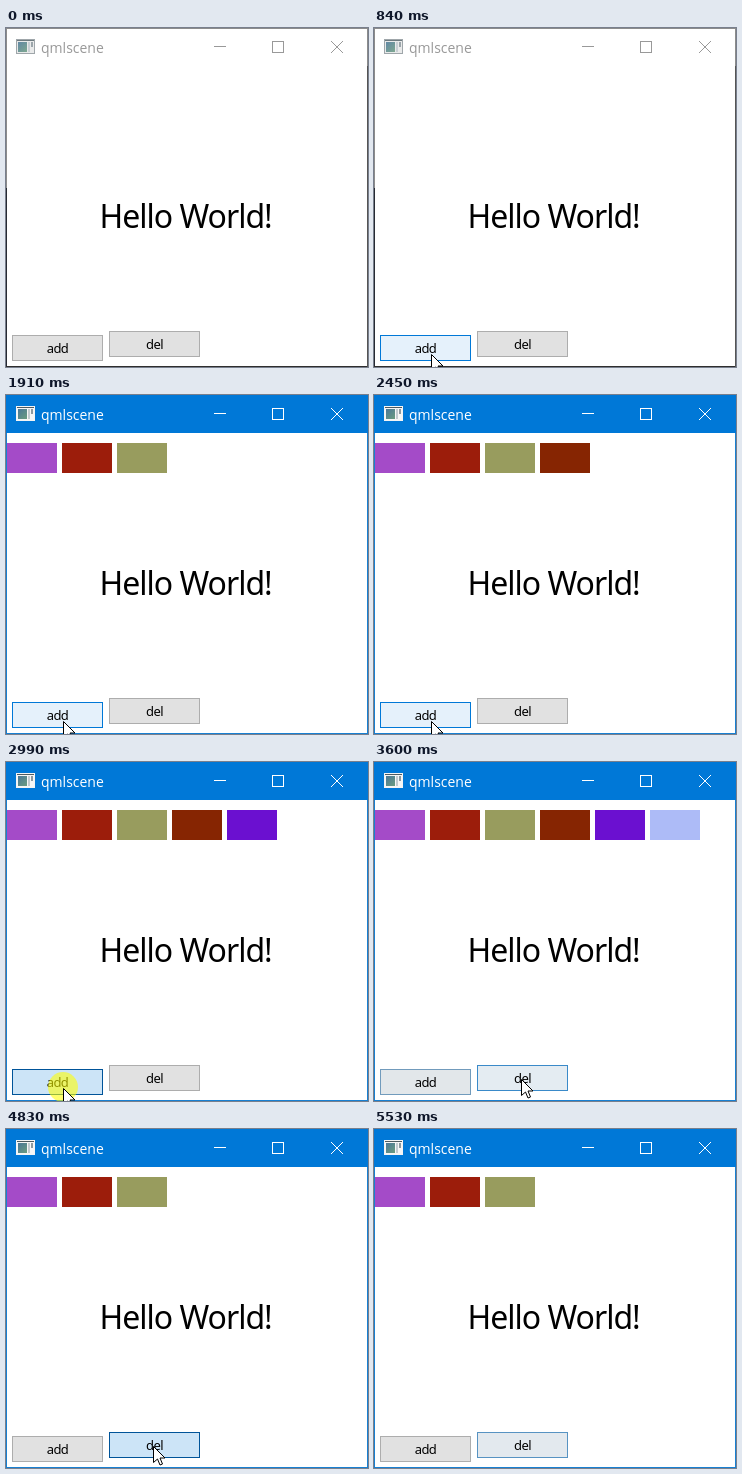
These frames come from a looping animation (362x339 px, 5600 ms). An HTML page with a canvas:

```html
<!DOCTYPE html>
<html lang="en">
<head>
<meta charset="utf-8">
<title>qmlscene</title>
<style>
html, body { margin: 0; width: 100%; height: 100%; overflow: hidden; background: #fff; }
canvas { display: block; }
</style>
</head>
<body>
<canvas id="stage" width="362" height="339"></canvas>
<script>
const ctx = document.getElementById('stage').getContext('2d');
const LOOP = 5600, TICK = 76.7;

const COLORS = ['#a44bc8', '#9c1d0b', '#989c5e', '#862502', '#6b10d0', '#adbbf7'];
const NORMAL = { fill: [225, 225, 225], edge: [173, 173, 173] };
const HOVER = { fill: [229, 241, 251], edge: [0, 120, 215] };
const PRESSED = { fill: [204, 228, 247], edge: [0, 84, 153] };

// Clicks in ticks: highlight on, button down, button up, back to hover
const ADD_CLICKS = [[12, 13, 14, 16], [17, 17, 19, 21], [22, 23, 24, 25],
  [27, 28, 29, 32], [33, 34, 35, 36], [38, 39, 40, 41]];
const DEL_CLICKS = [[51, 52, 53, 55], [57, 58, 59, 60], [61, 61, 63, 66]];
const ACTIVATE = 13;

// Pointer path: tick, x, y
const PATH = [[7, 70, 338], [8, 64, 333], [10, 57, 326], [42, 57, 326],
  [47, 147, 317], [68, 147, 317], [71, 153, 336]];

const ramp = (t, a, b) => Math.min(1, Math.max(0, (t - a) / (b - a)));
const mix = (a, b, k) => a + (b - a) * k;
const mixRgb = (a, b, k) => `rgb(${a.map((v, i) => Math.round(mix(v, b[i], k)))})`;

function rect(color, x, y, w, h) {
  ctx.fillStyle = color;
  ctx.fillRect(x, y, w, h);
}

function frame(color, x, y, w, h) {
  ctx.strokeStyle = color;
  ctx.lineWidth = 1;
  ctx.strokeRect(x + 0.5, y + 0.5, w - 1, h - 1);
}

function text(str, x, y, font, color, spacing = 0, align = 'left') {
  ctx.font = font;
  ctx.letterSpacing = spacing + 'px';
  ctx.textAlign = align;
  ctx.fillStyle = color;
  ctx.fillText(str, x, y);
}

function drawIcon(active) {
  ctx.globalAlpha = active ? 1 : 0.85;
  rect(active ? '#f4f4f4' : '#8f979c', 10, 11, 19, 15);
  rect('#f6f6f6', 11, 13, 17, 12);
  rect(active ? '#4d5a60' : '#66747a', 11, 12, 17, 1);
  const fill = ctx.createLinearGradient(12, 14, 21, 24);
  fill.addColorStop(0, '#4a7798');
  fill.addColorStop(1, '#6b9c80');
  rect(fill, 12, 14, 9, 10);
  rect('#c3cbd0', 22, 14, 2, 10);
  rect('#8d999f', 25, 14, 2, 5);
  ctx.globalAlpha = 1;
}

function drawControls(color) {
  rect(color, 208, 18, 12, 1);
  frame(color, 266, 13, 12, 12);
  ctx.beginPath();
  ctx.moveTo(325, 13);
  ctx.lineTo(337, 25);
  ctx.moveTo(337, 13);
  ctx.lineTo(325, 25);
  ctx.stroke();
}

function drawWindow(active) {
  rect('#fff', 0, 0, 362, 339);
  if (active) {
    frame('#1880d2', 0, 0, 362, 339);
    rect('#0078d7', 0, 0, 362, 38);
  } else {
    frame('#8c8c8c', 0, 0, 362, 339);
    rect('#262a33', 0, 160, 1, 179);
    rect('#2e2e2e', 0, 338, 362, 1);
    rect('#555', 361, 38, 1, 301);
  }
  drawIcon(active);
  const ink = active ? '#fff' : '#999';
  text('qmlscene', 35, 25, '14px "Open Sans", "Noto Sans", sans-serif', ink);
  drawControls(ink);
}

function drawButton(label, x, y, hover, pressed) {
  const base = pressed ? PRESSED : HOVER;
  rect(mixRgb(NORMAL.fill, base.fill, hover), x, y, 91, 26);
  frame(mixRgb(NORMAL.edge, base.edge, hover), x, y, 91, 26);
  text(label, x + 45.5, y + 18, '13px "Noto Sans", sans-serif', '#000', -0.6, 'center');
}

function pointerAt(t) {
  const last = PATH.length - 1;
  if (t < PATH[0][0] || t > PATH[last][0]) return null;
  const i = Math.max(1, PATH.findIndex(p => t <= p[0]));
  const [t0, x0, y0] = PATH[i - 1], [t1, x1, y1] = PATH[i];
  const k = ramp(t, t0, t1);
  return [Math.round(mix(x0, x1, k)), Math.round(mix(y0, y1, k))];
}

function drawPointer(x, y) {
  const shape = [[0, 0], [0, 16], [4, 12.5], [6.5, 18.5], [9, 17.5], [6.5, 11.5], [11.5, 11.5]];
  ctx.beginPath();
  shape.forEach(([dx, dy]) => ctx.lineTo(x + 0.5 + dx, y + 0.5 + dy));
  ctx.closePath();
  ctx.fillStyle = '#fff';
  ctx.fill();
  ctx.strokeStyle = '#000';
  ctx.lineWidth = 1;
  ctx.stroke();
}

function drawHighlight(x, y) {
  ctx.fillStyle = 'rgba(255, 255, 0, 0.58)';
  ctx.beginPath();
  ctx.arc(x, y, 15, 0, Math.PI * 2);
  ctx.fill();
}

function draw(ms) {
  const t = Math.floor((ms + 8) / TICK);
  const within = (clicks, a, b) => clicks.some(c => t >= c[a] && t < c[b]);
  const released = clicks => clicks.filter(c => t >= c[2]).length;

  drawWindow(t >= ACTIVATE);
  const count = released(ADD_CLICKS) - released(DEL_CLICKS);
  COLORS.slice(0, count).forEach((c, i) => rect(c, 1 + 55 * i, 48, 50, 30));
  text('Hello World!', 93.5, 200, '32px "Noto Sans", sans-serif', '#000', -1);

  const addHover = ramp(t, 7, 11) - ramp(t, 44, 48.6);
  const delHover = ramp(t, 45, 48) - ramp(t, 70, 74);
  drawButton('add', 6, 307, addHover, within(ADD_CLICKS, 1, 3));
  drawButton('del', 103, 303, delHover, within(DEL_CLICKS, 1, 3));

  const pointer = pointerAt(t);
  if (!pointer) return;
  const [x, y] = pointer;
  if (within(ADD_CLICKS, 0, 2) || within(DEL_CLICKS, 0, 2)) drawHighlight(x, y - 1);
  drawPointer(x, y);
}

const start = performance.now();
function loop() {
  draw((performance.now() - start) % LOOP);
  requestAnimationFrame(loop);
}
loop();
</script>
</body>
</html>
```
